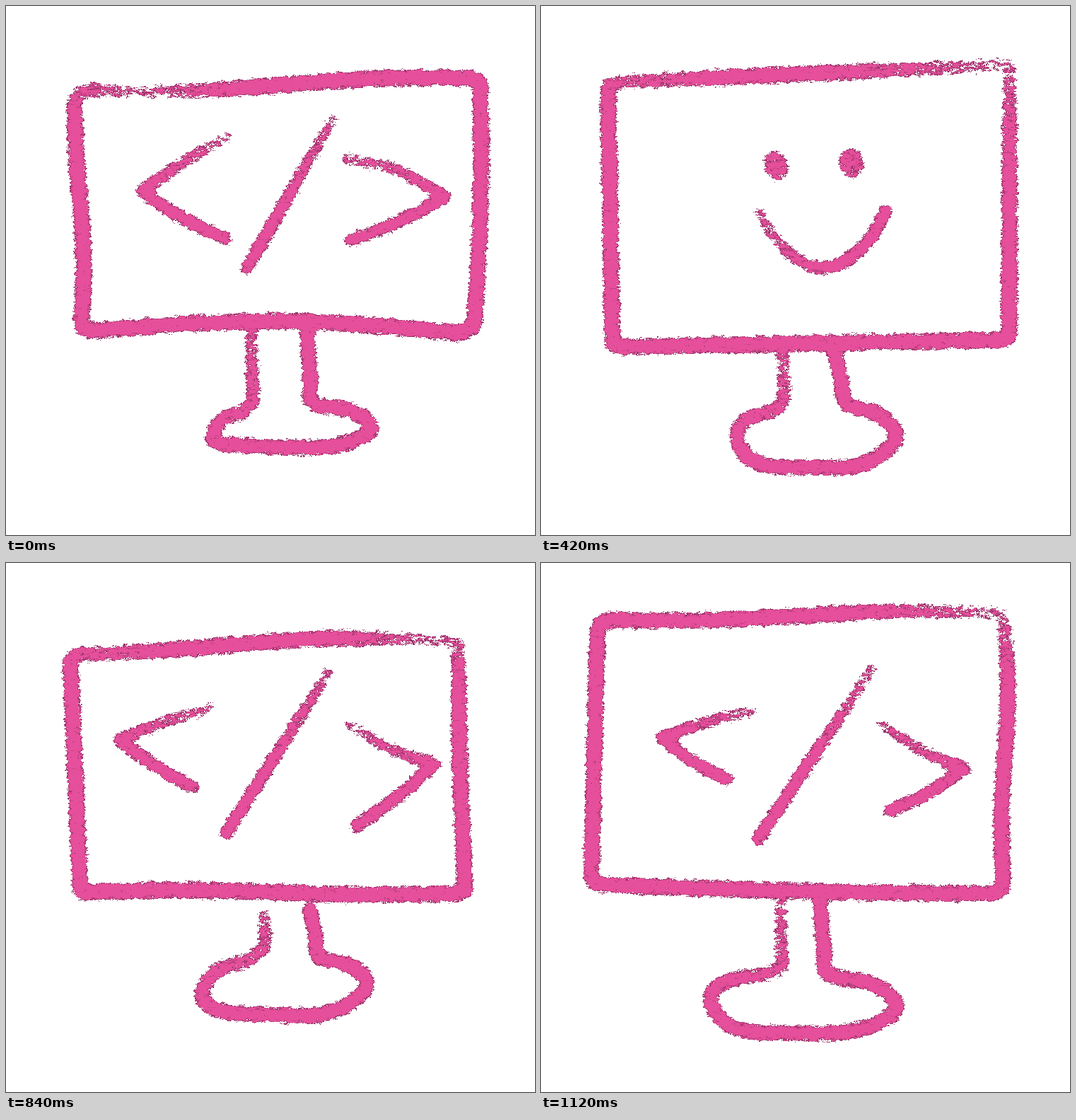
These frames come from a looping animation (748x748 px, 1260 ms). An HTML page with a canvas:

```html
<!DOCTYPE html>
<html lang="en">
<head>
<meta charset="utf-8">
<title>Crayon monitor</title>
<style>
  html, body { margin: 0; width: 100%; height: 100%; overflow: hidden; background: #fff; }
  canvas {
    position: absolute; left: 0; top: 0; width: 748px; height: 748px;
    visibility: hidden;
    animation: show 1260ms step-end infinite;
  }
  /* Every drawing holds for 140 ms; a later one covers an earlier one. */
  @keyframes show {
    0% { visibility: visible; }
    11.1111%, 100% { visibility: hidden; }
  }
</style>
</head>
<body>
<script>
const SIZE = 748, LOOP = 1260;
const PINK = [230, 79, 155], ROSE = [190, 64, 128], PLUM = [146, 50, 104];

function makeLayer() {
  const c = document.createElement("canvas");
  c.width = c.height = SIZE;
  return c.getContext("2d", { willReadFrequently: true });
}
const press = makeLayer(), soft = makeLayer();

const mix = (a, b, t) => a + (b - a) * t;
// Point between a and b, with its own share along each axis
const between = (a, b, tx, ty = tx) => [mix(a[0], b[0], tx), mix(a[1], b[1], ty)];

function hash(x, y) {
  let h = Math.imul(x, 374761393) + Math.imul(y, 668265263);
  h = Math.imul(h ^ (h >>> 13), 1274126177);
  return ((h ^ (h >>> 16)) >>> 0) / 4294967296;
}
function smoothNoise(x, y) {
  const i = Math.floor(x), j = Math.floor(y), u = x - i, v = y - j;
  return mix(mix(hash(i, j), hash(i + 1, j), u), mix(hash(i, j + 1), hash(i + 1, j + 1), u), v);
}

// Paper tooth, stretched sideways
const tooth = new Float32Array(SIZE * SIZE);
for (let y = 0, k = 0; y < SIZE; y++)
  for (let x = 0; x < SIZE; x++, k++)
    tooth[k] = 0.12 + 0.8 * (0.7 * smoothNoise(x / 5, y / 2.1) + 0.3 * hash(x + 5000, y));

function dab([x, y], width, force) {
  const g = Math.round(force * 247);
  press.fillStyle = `rgb(${g},${g},${g})`;
  press.beginPath();
  press.arc(x, y, width * (0.75 + 0.25 * force) / 2, 0, 7);
  press.fill();
}

// Smooth curve through the points; a repeated point makes a sharp corner.
function trace(pts) {
  const dirs = pts.map((p, i) => {
    const a = pts[i - 1] || p, b = pts[i + 1] || p;
    const d = Math.hypot(b[0] - a[0], b[1] - a[1]) || 1;
    return [(b[0] - a[0]) / d, (b[1] - a[1]) / d];
  });
  const out = [pts[0]];
  for (let i = 0; i + 1 < pts.length; i++) {
    const a = pts[i], b = pts[i + 1], len = Math.hypot(b[0] - a[0], b[1] - a[1]);
    const n = Math.ceil(len / 1.5);
    for (let s = 1; s <= n; s++) {
      const t = s / n, e = t * t * (3 - 2 * t);
      const m = t * (1 - t) * (1 - t) * len, q = t * t * (t - 1) * len;
      out.push([0, 1].map(c => mix(a[c], b[c], e) + m * dirs[i][c] + q * dirs[i + 1][c]));
    }
  }
  return out;
}
function stroke(pts, width, force) {
  trace(pts).forEach((p, i, all) => dab(p, width, force(i / all.length)));
}
const sign = pts => stroke(pts, 19, t => Math.min(1, 0.6 + 0.7 * t));

// The ring runs clockwise from the top left; worn spots are [place, reach, depth].
function screen({ corners, bow, round, worn }) {
  const force = u => worn.reduce((f, [at, reach, depth]) => {
    const gap = Math.abs(u - at), far = Math.min(gap, 4 - gap);
    return f - depth * Math.max(0, 1 - far / reach);
  }, 1);
  const spot = (side, t) => {
    const p = between(corners[side], corners[(side + 1) % 4], t);
    const [bend, wave] = bow[side] || [0, 0];
    p[(side + 1) % 2] += bend * Math.sin(Math.PI * t) + wave * Math.sin(2 * Math.PI * t);
    return p;
  };
  for (let side = 0; side < 4; side++) {
    const next = (side + 1) % 4, a = corners[side], b = corners[next];
    const trim = round / Math.hypot(b[0] - a[0], b[1] - a[1]);
    for (let t = trim; t <= 1 - trim; t += 0.0025) dab(spot(side, t), 23, force(side + t));
    const from = spot(side, 1 - trim), to = spot(next, trim);
    for (let t = 0; t <= 1; t += 0.05)
      dab(between(between(from, b, t), between(b, to, t), t), 23, force(side + 1));
  }
}

function stand({ neck, ankle, toe, base, heel, shin }) {
  const foot = t => mix(heel[0], toe[0], t);
  stroke([
    neck, [mix(neck[0], ankle[0], 0.6), ankle[1] - 30], ankle,
    between(ankle, toe, 0.63, 0.33), toe,
    [foot(0.91), mix(toe[1], base, 0.6)], [foot(0.73), base - 1], [foot(0.44), base],
    [foot(0.17), base - 3], [foot(0.05), mix(heel[1], base, 0.6)], heel,
    between(heel, shin, 0.25, 0.5), between(heel, shin, 0.75, 0.72), shin,
    [shin[0] + 1, shin[1] - 25], [shin[0], neck[1] + 6]
  ], 22, t => 1 - 0.4 * Math.max(0, (t - 0.6) / 0.4) ** 2);
}

function chevron([start, tip, end], bend) {
  const sag = (a, b, dy) => [(a[0] + b[0]) / 2, (a[1] + b[1]) / 2 + dy];
  sign([start, sag(start, tip, bend), tip, tip, sag(tip, end, 5), end]);
}
function code({ left, slash, right, bend = 7 }) {
  chevron(left, -3);
  sign(slash);
  chevron(right, bend);
}

function smile({ eyes, mouth: [x, y, width, depth] }) {
  for (const [ex, ey] of eyes)
    stroke([[ex - 1, ey - 4], [ex + 1, ey + 4]], 37, () => 0.82);
  const arc = Array.from({ length: 13 }, (_, i) =>
    [x + width * i / 12, y + depth * Math.abs(Math.sin(Math.PI * i / 12)) ** 0.75]);
  sign(arc);
}

function draw(start, pose) {
  press.globalCompositeOperation = "source-over";
  press.fillStyle = "#000";
  press.fillRect(0, 0, SIZE, SIZE);
  press.globalCompositeOperation = "lighten";
  screen(pose);
  stand(pose);
  (pose.eyes ? smile : code)(pose);
  soft.filter = "blur(3.8px)";
  soft.drawImage(press.canvas, 0, 0);

  const img = soft.getImageData(0, 0, SIZE, SIZE), d = img.data;
  const shift = start * 997;
  for (let k = 0; k < tooth.length; k++) {
    const over = d[k * 4] / 255 - tooth[(k + shift) % tooth.length];
    const ink = over > 0.18 ? PINK : over > 0.08 ? ROSE : PLUM;
    for (let c = 0; c < 3; c++) d[k * 4 + c] = over > 0 ? ink[c] : 255;
    d[k * 4 + 3] = 255;
  }
  const page = makeLayer();
  page.putImageData(img, 0, 0);
  page.canvas.style.animationDelay = `${start ? start - LOOP : 0}ms`;
  document.body.append(page.canvas);
}

const happy = {
  corners: [[95, 124], [639, 99], [636, 470], [100, 489]], bow: [], round: 11,
  worn: [[0.97, 0.45, 0.45], [0.08, 0.2, 0.3]],
  neck: [412, 490], ankle: [432, 562], toe: [502, 607], base: 656, heel: [277, 606], shin: [342, 560],
  eyes: [[329, 233], [437, 228]], mouth: [307, 294, 178, 82]
};
const wide = {
  corners: [[101, 94], [660, 77], [665, 488], [103, 493]], bow: [], round: 0,
  worn: [[0.98, 0.25, 0.35], [1.45, 0.9, 0.5], [2.97, 0.4, 0.4], [3.97, 0.2, 0.2]],
  neck: [415, 495], ankle: [420, 585], toe: [479, 632], base: 658, heel: [281, 632], shin: [370, 585],
  left: [[284, 236], [158, 289], [262, 320]], slash: [[484, 150], [278, 400]],
  right: [[484, 231], [588, 285], [488, 353]]
};

draw(0, {
  corners: [[97, 118], [671, 102], [661, 465], [106, 461]], round: 22,
  bow: [[2, 5], [5, 0], [-17, 0], [4, 3]], worn: [[0.15, 0.28, 0.5]],
  neck: [426, 456], ankle: [433, 560], toe: [516, 595], base: 624, heel: [292, 610], shin: [347, 560],
  left: [[314, 184], [192, 262], [310, 329]], slash: [[462, 160], [341, 370]],
  right: [[480, 216], [622, 270], [487, 331]], bend: -12
});
draw(140, {
  corners: [[78, 128], [651, 104], [659, 467], [92, 472]], round: 11,
  bow: [[1, 7], [3, -3], [-24, 3], [-8, 3]], worn: [[3.9, 0.9, 0.3]],
  neck: [387, 455], ankle: [405, 577], toe: [487, 603], base: 648, heel: [267, 627], shin: [346, 576],
  left: [[282, 229], [174, 271], [293, 325]], slash: [[457, 152], [333, 378]],
  right: [[474, 237], [600, 270], [490, 333]]
});
draw(280, {
  corners: [[97, 129], [664, 115], [664, 472], [101, 484]], bow: [], round: 0,
  worn: [[0.02, 0.4, 0.4], [1.05, 0.5, 0.2], [2.98, 0.45, 0.4]],
  neck: [416, 490], ankle: [432, 562], toe: [493, 612], base: 650, heel: [280, 613], shin: [350, 560],
  left: [[280, 248], [180, 291], [276, 329]], slash: [[460, 177], [300, 427]],
  right: [[488, 243], [594, 291], [507, 338]], bend: 2
});
draw(420, {
  ...happy, corners: [[95, 108], [663, 83], [662, 472], [101, 482]],
  neck: [414, 482], base: 652, eyes: [[332, 226], [439, 222]], mouth: [309, 290, 178, 80]
});
draw(560, happy);
draw(700, {
  ...happy, corners: [[93, 100], [662, 74], [664, 472], [102, 474]],
  neck: [418, 480], base: 647, toe: [504, 600], eyes: [[329, 228], [436, 224]], mouth: [305, 288, 178, 80]
});
draw(840, {
  corners: [[91, 130], [640, 112], [650, 467], [105, 466]], round: 11,
  bow: [[-9, 4], [-3, 0], [-1, 3], [0, 0]], worn: [[0.95, 0.28, 0.5], [0.1, 0.2, 0.2]],
  neck: [429, 492], ankle: [443, 556], toe: [510, 593], base: 639, heel: [277, 610], shin: [365, 543],
  left: [[290, 205], [160, 250], [264, 316]], slash: [[457, 153], [311, 383]],
  right: [[486, 229], [607, 284], [495, 372]]
});
draw(980, wide);
draw(1050, wide);
draw(1120, {
  corners: [[80, 80], [653, 71], [655, 468], [71, 454]], round: 18,
  bow: [[-1, 4], [2, 5], [3, 0], [0, 0]], worn: [[0.96, 0.35, 0.45]],
  neck: [394, 478], ankle: [405, 580], toe: [503, 625], base: 664, heel: [240, 612], shin: [339, 570],
  left: [[298, 209], [170, 247], [263, 306]], slash: [[468, 150], [307, 390]],
  right: [[482, 228], [599, 291], [493, 351]]
});
</script>
</body>
</html>
```
